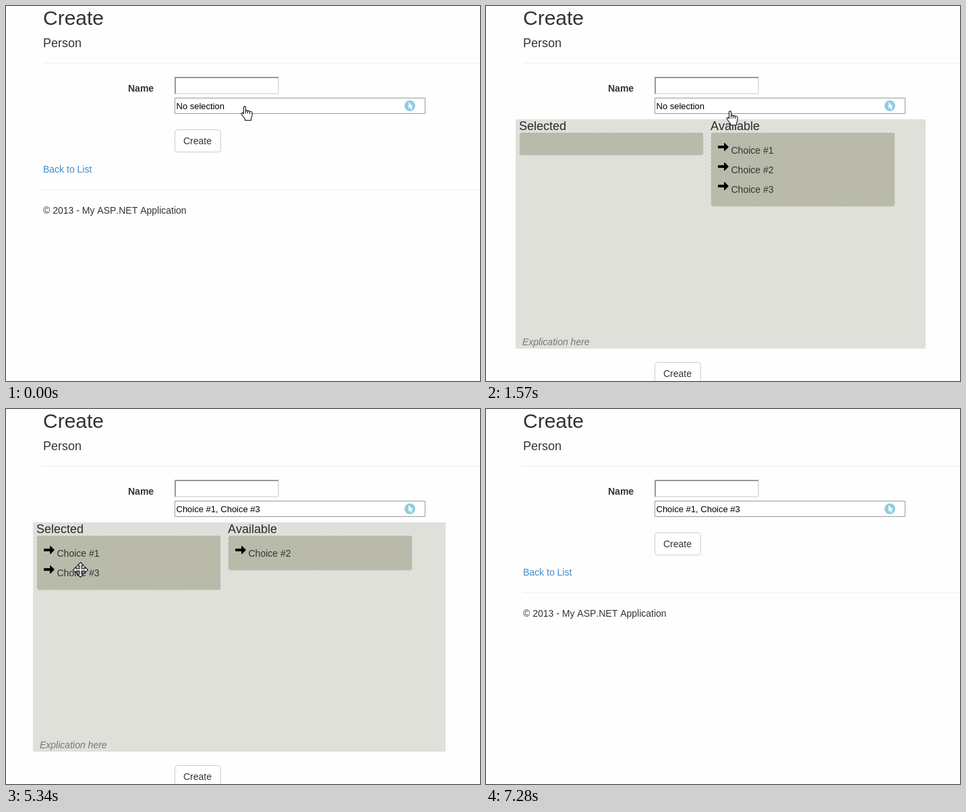
An HTML page with a canvas that plays this animation: 703 by 556 pixels, repeating every 8550 ms.

```html
<!DOCTYPE html>
<html lang="en">
<head>
<meta charset="utf-8">
<title>Create person</title>
<style>
  html, body { margin: 0; height: 100%; overflow: hidden; background: #fefefe; }
  canvas { display: block; }
</style>
</head>
<body>
<canvas id="stage" width="703" height="556"></canvas>
<script>
const ctx = document.getElementById('stage').getContext('2d');
const LOOP = 8550;

// The picture only changes at these moments (ms).
const ticks = [
  720, 870, 1020, 1170, 1300, 1430, 1570, 1710, 1870, 1990, 2260, 2410,
  2710, 2840, 2980, 3110, 3240, 3380, 3510, 3640, 4160, 4280, 4400,
  4670, 4840, 5010, 5180, 5340, 5490, 5630, 5750, 5870,
  6300, 6440, 6580, 6730, 6870, 7000, 7140, 7280
];
const SETTLED = 6, CLOSING = 32, CLOSED = 39;
const GRAB_1 = 2710, DROP_1 = 3240, GRAB_3 = 4160, DROP_3 = 5340;

// Pointer path: time, shape, hotspot.
const path = [
  [0, 'hand', 354, 148], [1170, 'hand', 354, 148], [1570, 'hand', 362, 155],
  [1710, 'arrow', 369, 164], [1990, 'move', 423, 204], [2410, 'move', 401, 211],
  [2710, 'move', 360, 212], [3110, 'move', 150, 216], [3240, 'move', 110, 214],
  [3640, 'move', 390, 240], [4160, 'move', 244, 242], [4400, 'move', 165, 240],
  [5340, 'move', 110, 238], [5630, 'arrow', 322, 172], [5750, 'hand', 320, 158],
  [5870, 'hand', 316, 148], [6300, 'hand', 335, 152], [6440, 'arrow', 385, 168],
  [6580, 'arrow', 430, 189], [7140, 'arrow', 575, 528], [7280, '', 0, 0]
];

const shapes = {
  hand: new Path2D('M-2 1.5Q-.5-.8 1 1.5V7Q2.6 5.6 4 7.3Q5.6 6.2 7 8Q9.2 7.2 10.5 9.2V13Q10.5 16 9 18V21H0V19Q-3.5 14.5-5.5 11.5Q-5 8.6-2 11Z' +
    'M1 7V11M4 7.3V11M7 8V11.5'),
  arrow: new Path2D('M0 0V16L3.8 12.6L6.4 18.6L9 17.5L6.5 11.6H11.3Z'),
  move: new Path2D('M0-11L4.5-6.5H1.5V-1.5H6.5V-4.5L11 0L6.5 4.5V1.5H1.5V6.5H4.5L0 11L-4.5 6.5H-1.5V1.5H-6.5V4.5L-11 0L-6.5-4.5V-1.5H-1.5V-6.5H-4.5Z')
};
const itemIcon = new Path2D('M1-2H9V-5.5Q9.5-6.5 10.5-5.5L16 0L10.5 5.5Q9.5 6.5 9 5.5V2H1Q0 2 0 1V-1Q0-2 1-2Z');

const swing = p => 0.5 - Math.cos(Math.PI * Math.min(p, 1)) / 2;

function rect(x, y, w, h, color) {
  ctx.fillStyle = color;
  ctx.fillRect(x, y, w, h);
}

function text(str, x, y, size, color = '#333', style = '') {
  ctx.font = `${style} ${size}px "Liberation Sans", Arial, sans-serif`;
  ctx.fillStyle = color;
  ctx.fillText(str, x, y);
}

function roundBox(x, y, w, h, r, fill, stroke, dash = []) {
  ctx.beginPath();
  ctx.roundRect(x + 0.5, y + 0.5, w - 1, h - 1, r);
  ctx.fillStyle = fill;
  ctx.fill();
  ctx.lineWidth = 1;
  ctx.strokeStyle = stroke;
  ctx.setLineDash(dash);
  ctx.stroke();
  ctx.setLineDash([]);
}

function shape(path2d, x, y, fill, stroke, scale = 1) {
  ctx.save();
  ctx.translate(x, y);
  ctx.scale(scale, scale);
  ctx.fillStyle = fill;
  ctx.fill(path2d);
  if (stroke) {
    ctx.lineWidth = 1.1;
    ctx.strokeStyle = stroke;
    ctx.stroke(path2d);
  }
  ctx.restore();
}

function pointerAt(t) {
  const i = path.findLastIndex(key => key[0] <= t);
  const [t0, kind, x0, y0] = path[i];
  const [t1, , x1, y1] = path[i + 1] || path[i];
  const p = t1 > t0 ? (t - t0) / (t1 - t0) : 0;
  return { kind, x: Math.round(x0 + (x1 - x0) * p), y: Math.round(y0 + (y1 - y0) * p) };
}

function item(n, x, baseline) {
  shape(itemIcon, x, baseline - 10, '#000');
  text('Choice #' + n, x + 19.5, baseline, 14);
}

function list(title, x, items, hasGap) {
  const h = Math.max(35, 24 + 29 * items.length + (hasGap ? 23 : 0));
  text(title, x, 184, 18, '#2a2a2a');
  roundBox(x, 187, 274, h, 4, '#babaab', '#e6e6df', [3, 3]);
  items.forEach((n, i) => item(n, x + 11, 219 + 29 * i));
}

function panel(t, step, chosen, pointer) {
  const closing = step >= CLOSING;
  const full = step >= SETTLED && !closing;
  const x = Math.round(closing
    ? 40 + 610 * swing(0.272 + 0.111 * (step - CLOSING))
    : 650 - 610 * swing(0.283 + 0.111 * step));
  const right = full ? 652 : 650;
  const bottom = step < SETTLED ? 477 : 508;
  const dragged = t >= GRAB_1 && t < DROP_1 ? 1 : t >= GRAB_3 && t < DROP_3 ? 3 : 0;
  const overSelected = pointer.x < 200;
  const available = [1, 2, 3].filter(n => n !== dragged && !chosen.includes(n));

  ctx.save();
  ctx.beginPath();
  ctx.rect(x, 168, right - x, bottom - 168);
  ctx.clip();
  rect(x, 168, right - x, bottom - 168, '#dfe0da');
  list('Selected', x + 5, chosen, dragged && overSelected);
  list('Available', x + 289, available, dragged && !overSelected);
  text('Explication here', x + 10, bottom - 5, 14, '#777', 'italic');
  if (dragged) item(dragged, pointer.x + 34, pointer.y + 2);
  ctx.restore();
  return bottom + 20;
}

function form(chosen) {
  text('Create', 55, 28, 30);
  text('Person', 55, 61, 18);
  rect(55, 84, 648, 1, '#eee');
  text('Name', 181, 127, 14, '#333', 'bold');

  rect(250, 105, 155, 26, '#e3e3e3');
  rect(250, 105, 154, 2, '#999');
  rect(250, 105, 2, 25, '#999');
  rect(252, 107, 151, 22, '#fff');

  roundBox(250, 136, 372, 24, 0, '#fff', '#999');
  const label = chosen.map(n => 'Choice #' + n).join(', ') || 'No selection';
  text(label, 252.5, 153, 13, '#000');
  ctx.beginPath();
  ctx.arc(599, 148, 8, 0, 7);
  ctx.fillStyle = '#8fcde1';
  ctx.fill();
  shape(shapes.arrow, 597, 142.5, '#fff', '', 0.6);
}

function footer(y) {
  roundBox(250, y, 69, 34, 4, '#fff', '#ccc');
  text('Create', 263, y + 22, 14);
  text('Back to List', 55, y + 64, 14, '#428bca');
  rect(55, y + 89, 648, 1, '#eee');
  text('© 2013 - My ASP.NET Application', 55, y + 125, 14);
}

function draw(now) {
  const time = now % LOOP;
  const step = ticks.findLastIndex(tick => tick <= time);
  const t = step < 0 ? 0 : ticks[step];
  const chosen = [];
  if (t >= DROP_1) chosen.push(1);
  if (t >= DROP_3) chosen.push(3);
  const pointer = pointerAt(t);

  ctx.fontKerning = 'none';
  rect(0, 0, 703, 556, '#fefefe');
  form(chosen);
  const open = step >= 0 && step < CLOSED;
  footer(open ? panel(t, step, chosen, pointer) : 183);
  if (pointer.kind) shape(shapes[pointer.kind], pointer.x + 0.5, pointer.y + 0.5, '#fff', '#112');
}

let start;
function loop(now) {
  start ??= now;
  draw(now - start);
  requestAnimationFrame(loop);
}
draw(0);
requestAnimationFrame(loop);
</script>
</body>
</html>
```
